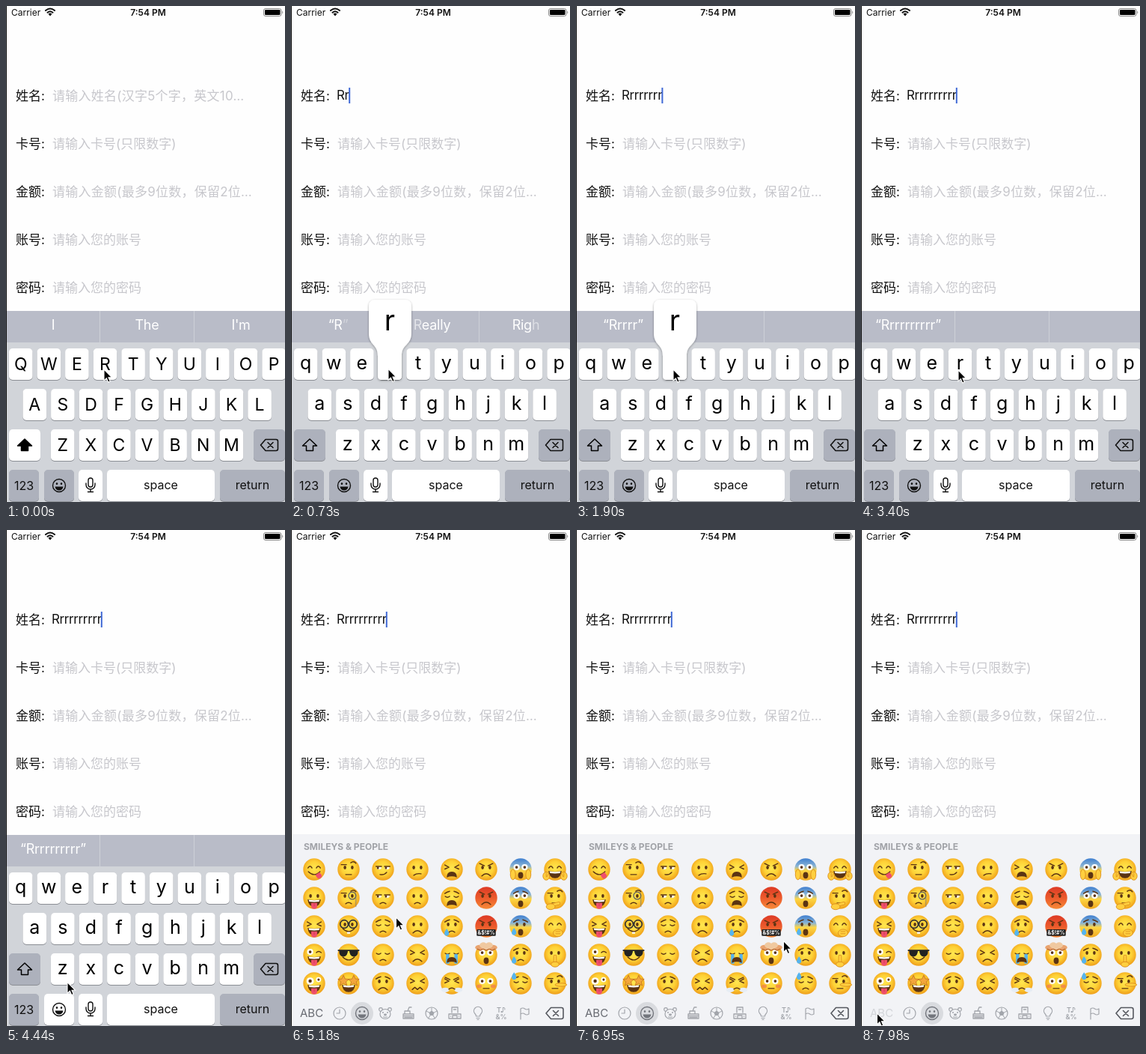
An HTML page for the animation above (8000 ms loop, 373x662 px).

```html
<!DOCTYPE html>
<html lang="zh-CN">
<head>
<meta charset="utf-8">
<title>Form input</title>
<style>
html, body { margin: 0; width: 100%; height: 100%; overflow: hidden; background: #fefefe; }
svg { display: block; font: 17px Inter, "Noto Sans CJK SC", "Noto Sans CJK JP", sans-serif; }
</style>
</head>
<body>
<svg id="stage" width="373" height="662" viewBox="0 0 373 662"></svg>
<script>
const stage = document.getElementById('stage');
const LOOP = 8000, STEP = 147.6;
const BROWN = '#5b3413', HAND = '#ffcf3f', EDGE = '#d98b1c', BLUE = '#55b4ee', GREY = '#a2a5ab';

// Drawing helpers
const rect = (x, y, w, h, fill, r = 0) =>
  `<rect x="${x}" y="${y}" width="${w}" height="${h}" rx="${r}" fill="${fill}"/>`;
const oval = (x, y, rx, ry, fill, extra = '') =>
  `<ellipse cx="${x}" cy="${y}" rx="${rx}" ry="${ry}" fill="${fill}" ${extra}/>`;
const shape = (d, fill, extra = '') => `<path d="${d}" fill="${fill}" ${extra}/>`;
const line = (d, w = 1.5, color = BROWN) =>
  `<path d="${d}" fill="none" stroke="${color}" stroke-width="${w}" stroke-linecap="round" stroke-linejoin="round"/>`;
const ring = (x, y, r, w, color) => oval(x, y, r, r, 'none', `stroke="${color}" stroke-width="${w}"`);
const text = (s, x, y, size, fill, extra = '') =>
  `<text x="${x}" y="${y}" font-size="${size}" fill="${fill}" ${extra}>${s}</text>`;
const mid = (s, x, y, size, fill, extra = '') => text(s, x, y, size, fill, 'text-anchor="middle" ' + extra);
const at = (x, y, s, scale = 1) => `<g transform="translate(${x} ${y}) scale(${scale})">${s}</g>`;
const both = s => s + `<g transform="scale(-1 1)">${s}</g>`;

const defs = `<defs>
<radialGradient id="yellow" cy=".45" r=".57"><stop stop-color="#ffe750"/><stop offset=".55" stop-color="#fed136"/><stop offset="1" stop-color="#ed9a18"/></radialGradient>
<linearGradient id="red" x2="0" y2="1"><stop stop-color="#dd3a25"/><stop offset=".5" stop-color="#ec5a2c"/><stop offset="1" stop-color="#f68a38"/></linearGradient>
<linearGradient id="cold" x2="0" y2="1"><stop stop-color="#3f7fd0"/><stop offset=".35" stop-color="#8ab4d4"/><stop offset=".55" stop-color="#fdd544"/><stop offset="1" stop-color="#f0a822"/></linearGradient>
<filter id="soft" x="-20%" y="-20%" width="140%" height="140%"><feDropShadow dx="0" dy="1" stdDeviation="1.6" flood-opacity=".35"/></filter>
</defs>`;

// Emoji: one letter per part, drawn around the origin with radius 15
const hand = (x, y, rx, ry) => oval(x, y, rx, ry, HAND, `stroke="${EDGE}" stroke-width=".9"`);
const finger = d => line(d, 4.6, EDGE) + line(d, 3, HAND);
const drop = (x, y) => shape(`M${x} ${y}q4 5.5 3 8a3.2 3.2 0 0 1-6 0q-1-2.5 3-8z`, BLUE);
const eye = (x, y, r) => oval(x, y, r, r, '#fff') + oval(x, y, r * .45, r * .45, BROWN);
const parts = {
  Y: oval(0, 0, 15, 15, 'url(#yellow)'),
  R: oval(0, 0, 15, 15, 'url(#red)'),
  B: oval(0, 0, 15, 15, 'url(#cold)'),
  o: both(oval(5, -2.5, 1.8, 2.5, BROWN)),
  h: both(line('M3-2q2.5-4.5 5.5 0')),
  c: both(line('M3-2q3 2.5 6 0')),
  x: both(line('M9.5-6L4-3 9.5-.5')),
  w: both(eye(5.5, -3, 4.2)),
  i: eye(-5.5, -4, 4.2) + line('M3-3q3-3 6.5 0'),
  y: eye(-5.5, -3, 5) + eye(6, -5, 3.5),
  s: both(oval(5.5, -2, 3.3, 2, '#fff') + line('M2-4h7.5')) + oval(-7, -2, 1.5, 1.8, BROWN) + oval(4, -2, 1.5, 1.8, BROWN),
  a: both(line('M2.5-5L9-8')),
  u: both(line('M3-9Q6-8.5 9.5-6')),
  r: line('M-10-6.5h7M3-9q4-3 7 .5'),
  S: line('M-8 3q8 8 16 0'),
  T: shape('M-4 7h8v4a4 4 0 0 1-8 0z', '#ef4f6c') + line('M0 8v3', .8, '#c92f50'),
  t: drop(-7, 3),
  P: `<g transform="rotate(-35 4 6)">${shape('M1 6h7v4a3.5 3.5 0 0 1-7 0z', '#ef4f6c')}</g>`,
  G: shape('M-9 2q9 2 18 0q-1 10-9 10t-9-10z', BROWN) + shape('M-7.5 2.500q7.500 1.500 15 0l-.8 2.500q-6.700 1-13.400 0z', '#fff'),
  F: line('M-6 9q6-6 12 0'),
  f: line('M-4 8q4-3 8 0'),
  k: line('M-4 7q6 1 9-3'),
  K: line('M-5 8q4-3 10-2'),
  O: oval(0, 8, 3.5, 4.5, BROWN),
  W: shape('M-7 11Q-7 3 0 3T7 11Q0 8-7 11z', BROWN),
  z: line('M-7 8.5l3.5-3 3.5 3 3.5-3 3.5 3'),
  l: line('M-4 7h8'),
  d: drop(-9, -15),
  D: drop(-9, 2),
  j: both(rect(3.5, -1, 4.5, 13, BLUE, 1)),
  e: both(oval(9, 9, 5.5, 3.2, '#e6edf5')),
  n: hand(8, 2, 8, 2.2),
  m: ring(5, -3, 5, 1.3, '#565b66') + line('M10-1v13', .8, '#777'),
  g: both(ring(6, -3, 5.5, 1.7, '#333')) + line('M-1-4h2', 1.5, '#333') + rect(-2, 7, 4, 3, '#fff'),
  v: line('M-14-6h28', 1.8, '#222') + both(shape('M1-6h12q0 9-6 8.500T1-6z', '#222')),
  '*': both(shape('M7-11l2.200 5 5.300.4-4.100 3.500 1.300 5.200L7 0 2.300 3.100l1.300-5.200L-.5-5.600l5.300-.4z', '#f3a63c', 'stroke="#b8651a" stroke-width=".7"')),
  '!': both(oval(9, -10, 6, 3.5, '#e9a36f') + oval(4, -13, 5, 4, '#f0c9a0')) + rect(-5, -11, 10, 4, '#f0c9a0') + line('M-12-8l4 2 4-2 4 2 4-2 4 2 4-2', 1.2, '#b8652f'),
  '&': rect(-13, 4, 26, 9, '#222', 1) + mid('&amp;$!#%', 0, 11, 7, '#fff', 'font-weight="700"'),
  p: both(oval(9.5, 4, 3.5, 2.5, '#f0774f', 'opacity=".7"')),
  H: both(hand(12, 9, 4.5, 5.5) + line('M9 6l2 4M12 5v5', .8, EDGE)),
  q: finger('M-6 10L5 7.500') + hand(-6, 12, 6, 4),
  M: hand(4, 9, 6.5, 5) + line('M1 7h6M1 10h6', .8, EDGE),
  Q: finger('M0 12V2') + hand(0, 13, 5.5, 3.5),
  A: both(hand(10.5, 7, 3.5, 7)),
};
// Column by column
const faces = ('YhSP YoGT YxGT YiGT YyGT Yorl Yorfm YogS YvS YG* Ysk Ysf Ycuf Ycf YouF YoK Yof YoF YxF Yxz ' +
  'YxW YcuW Youft YcjW Yxaef YoaF RoaF Roa& YwO! Ywpl BwOA BwuO BouOD YoufD Ycufd YhGH Yorlq YhM YoQ Yorln').split(' ');

const delKey = (x, y, color) => at(x, y,
  line('M-11.500 0L-5-7.500H9q2.500 0 2.500 2.500v10q0 2.500-2.500 2.500H-5z', 1.6, color) + line('M-2-3.500l7 7m0-7l-7 7', 1.6, color));
const smiley = (x, y, color) => at(x, y,
  ring(0, 0, 8.5, 1.4, color) + both(oval(3, -2.5, 1.2, 1.6, color)) + shape('M-5.500 1.500h11q-1 5-5.500 5t-5.500-5z', color));

const icons =
  at(65, 645, ring(0, 0, 8, 1.2, GREY) + line('M0-5V0H-4', 1.2, GREY)) +
  oval(95, 645, 15, 15, '#d9dbdf') + smiley(95, 645, '#73767d') +
  at(126, 645, both(ring(6, -5, 2.3, 1.2, GREY)) + oval(0, 1, 7, 6.5, '#f2f3f6', `stroke="${GREY}" stroke-width="1.200"`) +
    both(oval(3, -1, 1, 1, GREY)) + oval(0, 2, 2, 1.4, GREY) + line('M-2.500 5q2.500 1 5 0', 1, GREY)) +
  at(157, 645, line('M-7 7V1H7V7zM-7 3.500H7M-5 1V-3H2V1M-1-3L1-8H4', 1.3, GREY) + line('M-5 5.500H5', 1.5, GREY)) +
  at(188, 645, ring(0, 0, 8, 1.2, GREY) + shape('M0-3.500l3.500 2.500-1.300 4h-4.400l-1.300-4z', GREY) +
    both(line('M3.500-1L7-3M2 3l2.500 4', 1, GREY)) + line('M0-3.500V-7', 1, GREY)) +
  at(219, 645, line('M-4-1V-8H4V-1M-8 7V1H8V7zM-3 7V3H3V7', 1.3, GREY) + line('M-1.500-5h3M-5.500 4h0M5.500 4h0', 1.6, GREY)) +
  at(250, 645, line('M-2.500 4Q-2.500 2-4.500 0A5.500 5.500 0 1 1 4.500 0Q2.500 2 2.500 4zM-2 6.500h4M-1 8.500h2', 1.2, GREY)) +
  mid('T♪', 281, 644, 9, GREY, 'font-weight="600"') + mid('&amp;%', 281, 653, 9, GREY, 'font-weight="600"') +
  at(312, 645, line('M-5 8V-6q3-2 5.500 0t5.500 0v7q-3 2-5.500 0t-5.500 0', 1.2, GREY));

const emojiBoard = k => rect(1, 406, 372, 256, '#f2f3f6') +
  text('SMILEYS &amp; PEOPLE', 17, 427, 12, '#a0a2a7', 'font-weight="700"') +
  faces.map((f, i) => at(31 + 46 * Math.floor(i / 5), 453 + 38 * (i % 5), [...f].map(c => parts[c]).join(''), .98)).join('') +
  text('ABC', 12, 650, 15, k > 52 ? '#d3d5d9' : '#686b72') + icons + delKey(352.5, 645, '#55585f');

// Status bar and form
const fields = [
  ['姓名', '请输入姓名(汉字5个字，英文10…', .25],
  ['卡号', '请输入卡号(只限数字)', 0],
  ['金额', '请输入金额(最多9位数，保留2位…', .25],
  ['账号', '请输入您的账号', 0],
  ['密码', '请输入您的密码', 0],
];
const word = n => 'R' + 'r'.repeat(n - 1);

function form(typed) {
  let s = rect(0, 0, 373, 662, '#fefefe') +
    text('Carrier', 7, 13, 12, '#111') + mid('7:54 PM', 190, 13, 12, '#111', 'font-weight="600"') +
    line('M53 6q6-5 12 0M55.500 8.700q3.500-3 7 0', 2, '#111') + shape('M59 13.500l-2.500-3q2.500-2 5 0z', '#111') +
    `<rect x="344.500" y="3.500" width="23.500" height="10" rx="2.500" fill="none" stroke="#888"/>` +
    rect(346, 5, 20.5, 7, '#000', 1.2) + shape('M369.300 6.500q2 2 0 4z', '#888');
  fields.forEach(([label, hint, gap], i) => {
    const y = 126 + 64 * i;
    s += text(label + ':', 13, y, 17, '#111');
    s += i || !typed ? text(hint, 62, y, 17, '#c7c7cc', `letter-spacing="${gap}"`)
      : text(word(typed), 61, y - 1, 17, '#111', 'letter-spacing="-.4"') + rect(71 + 6.2 * (typed - 1), 109, 2, 21, '#4069d6');
  });
  return s;
}

// Letter keyboard
const key = (x, y, w, fill = '#fff') => rect(x, y + 1, w, 42, '#8b8e94', 5) + rect(x, y, w, 42, fill, 5);
const DARK = '#adb1bc';

function suggestions(k, typed) {
  const quote = n => `“${word(n)}”`;
  const fade = (s, o) => `<tspan fill-opacity="${o}">${s}</tspan>`;
  if (k < 5) return ['I', 'The', "I'm"];
  if (k === 5) return ['“R' + fade('”', .35), fade('R', .6) + 'eally', 'Rig' + fade('h', .5)];
  if (k < 9) return [quote(2), 'Really', 'Right'];
  return [quote(k < 23 ? Math.min(typed - 3, 6) : 10)];
}

function letterBoard(k, typed, pressed) {
  const upper = k < 2;
  let s = rect(1, 407, 372, 255, '#d1d4d9') + rect(1, 407, 372, 42, '#b9bcc8') +
    rect(125, 407, 1, 42, '#cdd0d8') + rect(251, 407, 1, 42, '#cdd0d8');
  suggestions(k, typed).forEach((w, i) => s += mid(w, 63 + 125.5 * i, 432, 18, '#fff', 'letter-spacing="-.25"'));
  ['qwertyuiop', 'asdfghjkl', 'zxcvbnm'].forEach((row, r) => [...row].forEach((c, i) => {
    const x = [19.7, 38.3, 75.7][r] + 37.6 * i, y = 457 + 54 * r;
    s += key(x - 15.8, y, 31.6) + mid(upper ? c.toUpperCase() : c, x, y + (upper ? 29 : 28), upper ? 23 : 25, '#000');
  }));
  s += key(4, 565, 42, upper ? '#fff' : DARK) + key(331, 565, 42, DARK) + delKey(352, 586, '#111') +
    at(25, 586, shape('M0-8L9.500 1H4.500V7.500H-4.500V1H-9.500z', upper ? '#000' : 'none', 'stroke="#000" stroke-width="1.500" stroke-linejoin="round"'));
  s += key(4, 619, 40, DARK) + mid('123', 24, 646, 16, '#111') +
    key(51, 619, 40, k > 27 ? '#fff' : DARK) + smiley(71, 640, '#111') +
    key(97, 619, 32) + at(113, 639, `<rect x="-3" y="-9" width="6" height="12" rx="3" fill="none" stroke="#111" stroke-width="1.400"/>` +
      line('M-6-2V0a6 6 0 0 0 12 0V-2M0 6V9.500M-3.500 9.500h7', 1.4, '#111')) +
    key(135, 619, 144) + mid('space', 207, 645, 16, '#111') +
    key(286, 619, 87, DARK) + mid('return', 329.5, 645, 16, '#111');
  if (pressed) s += shape('M113 392H152q9 0 9 9V436C161 454 148 450 148 467V494q0 5-5 5H121q-5 0-5-5V467C116 450 104 454 104 436V401q0-9 9-9z', '#fff', 'filter="url(#soft)"') +
    mid(upper ? 'R' : 'r', 132, 433, upper ? 35 : 38, '#000');
  return s;
}

// Pointer way points: step, x, y
const path = [[0, 131, 485], [1, 130, 484], [23, 130, 486], [26, 92, 600], [28, 72, 638], [29, 73, 637], [30, 82, 603.5],
  [31, 92, 578], [33, 120, 535], [35, 140.5, 517], [36, 180, 520], [38, 261, 540], [39, 275, 542], [40, 275, 542],
  [41, 262, 568], [42, 218, 525], [43, 230, 465], [44, 290, 443], [45, 340, 495], [46, 322, 550], [47, 277.5, 548.5],
  [48, 285, 515], [49, 294, 470], [50, 268, 446], [51, 200, 510], [52, 105, 605], [53, 32, 644], [54, 21.5, 645]];

function pointer(k) {
  const i = Math.max(1, path.findIndex(p => p[0] >= k));
  const [a, ax, ay] = path[i - 1], [b, bx, by] = path[i];
  const f = (k - a) / (b - a);
  return at(ax + (bx - ax) * f, ay + (by - ay) * f,
    shape('M0 0V16.500L3.800 13 6.400 19 9.200 17.800 6.600 12H11.800z', '#000', 'stroke="#fff" stroke-width="1.200"'), .9);
}

const typedAt = [0, 0, 1, 1, 1, 2, 3, 4, 4, 5, 6, 7, 7, 8, 9, 9];
const pressedAt = '01010101010101001011111';

function draw(k) {
  const typed = typedAt[k] ?? 10;
  return defs + form(typed) +
    (k > 30 ? emojiBoard(k) : letterBoard(k, typed, pressedAt[k] === '1')) +
    rect(0, 0, 1, 662, '#111') + pointer(k);
}

let shown = -1;
function tick() {
  const k = Math.min(54, Math.floor((performance.now() % LOOP + 20) / STEP));
  if (k !== shown) stage.innerHTML = draw(shown = k);
  requestAnimationFrame(tick);
}
tick();
</script>
</body>
</html>
```
